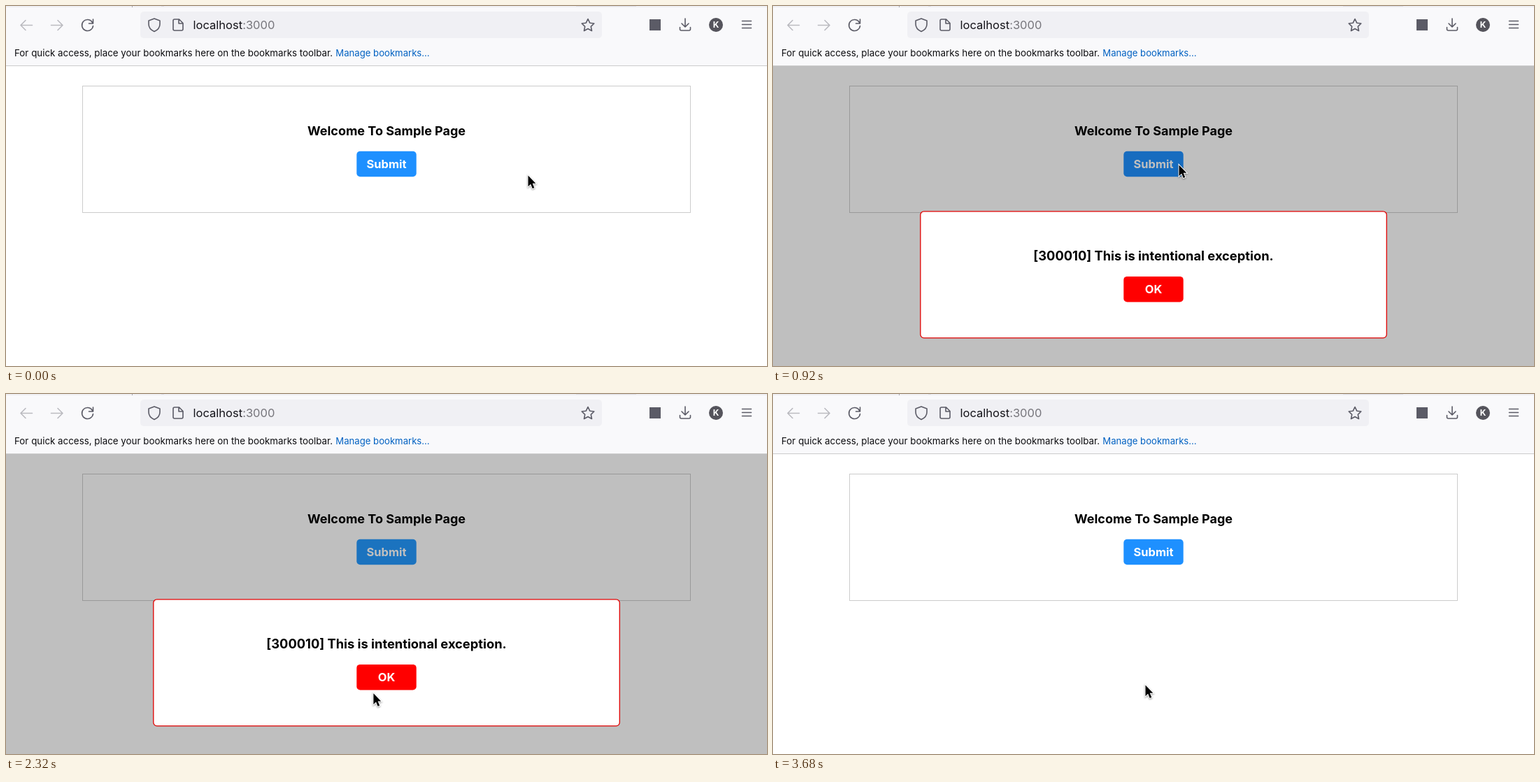
Write an HTML page that moves like this. It is 1088 px wide and 515 px high and loops after 4.8 s.

```html
<!DOCTYPE html>
<html lang="en">
<head>
<meta charset="utf-8">
<title>Sample page</title>
<style>
  html, body { margin: 0; height: 100%; overflow: hidden; background: #fff; }
  svg { display: block; width: 100vw; height: 100vh; font-family: Inter, "Open Sans", sans-serif; font-optical-sizing: none; }
  .title { font-size: 18px; font-weight: 700; text-anchor: middle; }
  .label { font-size: 16.5px; font-weight: 700; text-anchor: middle; fill: #fff; }
  .icon { fill: none; stroke: #5b5b66; stroke-width: 1.6; stroke-linecap: round; stroke-linejoin: round; }
  .off { stroke: #bbbbc0; }
  .url { font-size: 16.55px; fill: #15141a; }
  .note { font-size: 13.35px; fill: #0c0c0f; }
  .link { font-size: 13.15px; fill: #0061c2; }
</style>
</head>
<body>
<svg viewBox="0 0 1088 515">
  <!-- browser toolbar -->
  <rect width="1088" height="85" fill="#f9f9fb"/>
  <rect width="1088" height="2" fill="#f0f0f4"/>
  <path d="M180.5 0v2" stroke="#aaaab0"/>
  <path d="M222 .5h4M815 .5h86" stroke="#e0e0e6"/>
  <rect x="192" y="8" width="660" height="38" rx="5" fill="#f0f0f4"/>
  <path d="M0 85.5h1088" stroke="#ccc"/>

  <g class="icon">
    <path class="off" d="M37.5 27.5H21m7-7-7 7 7 7M64.5 27.5H81m-7-7 7 7-7 7"/>
    <path d="M123.5 23.5a8 8 0 1 0 1 5M124.500 19v6h-6"/>
    <path d="M212 18l8 3v5c0 5-3.5 8.5-8 10.5-4.500-2-8-5.500-8-10.500v-5z"/>
    <path d="M241 19h6.500l5.500 5.500V33a2 2 0 0 1-2 2h-10a2 2 0 0 1-2-2V21a2 2 0 0 1 2-2zM247 19.500V25h5.500"/>
    <path d="M832 18.500l2.700 5.700 6.100.8-4.500 4.300 1.200 6.200-5.500-3-5.500 3 1.200-6.200-4.500-4.300 6.100-.8z"/>
    <path d="M971 18v12m-5-5 5 5 5-5M963.500 30.500V33a2 2 0 0 0 2 2h11a2 2 0 0 0 2-2v-2.500"/>
    <path d="M1052.500 21.500h13m-13 5h13m-13 5h13"/>
  </g>
  <rect x="920" y="19" width="16" height="16" fill="#5b5b66"/>
  <circle cx="1015" cy="27" r="10" fill="#55545c"/>
  <text x="1015" y="31.300" class="label" style="font-size:12px">K</text>

  <text x="267.500" y="33" class="url">localhost<tspan fill="#77767c">:3000</tspan></text>
  <text x="12" y="72" class="note">For quick access, place your bookmarks here on the bookmarks toolbar.</text>
  <text x="471.300" y="72" class="link">Manage bookmarks…</text>

  <!-- page -->
  <rect x="109.500" y="114.500" width="869" height="181" fill="none" stroke="#ccc"/>
  <text x="544" y="185.300" class="title">Welcome To Sample Page</text>
  <rect id="submit" x="501.300" y="207.700" width="85.400" height="36.500" rx="5"/>
  <text x="544" y="232" class="label">Submit</text>

  <g id="dialog">
    <rect y="86" width="1088" height="429" opacity=".25"/>
    <rect x="210.800" y="293.800" width="666.500" height="181" rx="5" fill="#fff" stroke="#e00000" stroke-width="1.300"/>
    <text x="544" y="364.300" class="title" style="font-size:18.300px">[300010] This is intentional exception.</text>
    <rect x="501.300" y="386.900" width="85.400" height="36.500" rx="5" fill="red"/>
    <text x="544" y="411.300" class="label">OK</text>
  </g>

  <path id="cursor" d="M.5.5V16.200L4.100 12.800 6.700 19 9.300 17.900 6.700 11.800H11.300Z" stroke="#fff" stroke-width="2" paint-order="stroke" style="filter:drop-shadow(0 1px 1px #0006)"/>
</svg>
<script>
const LOOP = 4800, STEP = 40, OPEN = 920, CLOSE = 3680;
const [submit, dialog, cursor] = ['submit', 'dialog', 'cursor'].map(id => document.getElementById(id));

// Pointer rests, joined by one Bézier sweep each
const home = [746, 242], onSubmit = [580, 227], below = [512, 453], nearOk = [524, 428.5], edge = [527, 417], onOk = [532, 416];
const sweeps = [
  { from: 0, to: 440, curve: [home, [690, 240], [545, 226], onSubmit] },
  { from: 1200, to: 1760, curve: [onSubmit, [847, 336], [803, 590], below] },
  { from: 1760, to: 2040, curve: [below, below, nearOk, nearOk] },
  { from: 2300, to: 2800, curve: [nearOk, [530, 424], [543, 411], edge] },
  { from: 3040, to: 3480, curve: [edge, [536, 417], [543, 417], onOk] }
];

const mix = (a, b, k) => a + (b - a) * k;
const clamp = k => Math.max(0, Math.min(1, k));
const easeOut = k => k * (1.2 - 0.2 * k);

// De Casteljau: blend neighbours until one point is left
function bezier(points, k) {
  if (points.length === 1) return points[0];
  const blended = points.slice(1).map((p, i) => p.map((v, axis) => mix(points[i][axis], v, k)));
  return bezier(blended, k);
}

function pointerAt(t) {
  const { from, to, curve } = sweeps.filter(s => s.from <= t).pop();
  return bezier(curve, easeOut(clamp((t - from) / (to - from))));
}

function draw(now) {
  const t = Math.floor(now % LOOP / STEP) * STEP;
  const open = t >= OPEN && t < CLOSE;
  const lift = open ? clamp((t - OPEN) / 80) : 0;
  dialog.style.display = open ? '' : 'none';
  submit.setAttribute('fill', `rgb(${mix(30, 36, lift)}, ${mix(144, 153, lift)}, 255)`);
  cursor.setAttribute('transform', `translate(${pointerAt(t)})`);
}

const start = performance.now();
(function tick() {
  draw(performance.now() - start);
  requestAnimationFrame(tick);
})();
</script>
</body>
</html>
```
